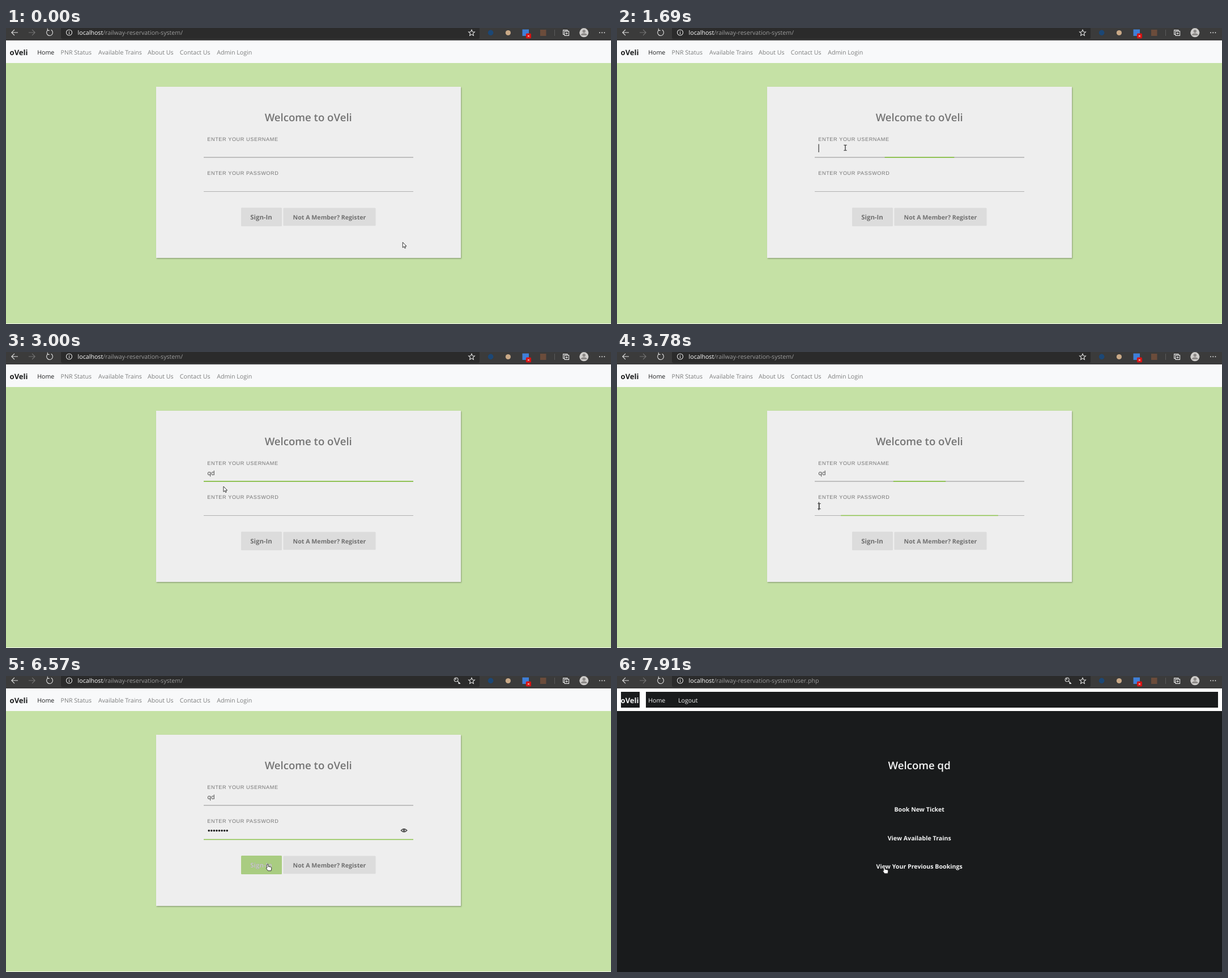
Animation of 1068x524 px, one loop 8 s. Source, as an HTML page:

```html
<!DOCTYPE html>
<html lang="en">
<head>
<meta charset="utf-8">
<title>Railway reservation sign-in</title>
<style>
  html, body { margin: 0; width: 100%; height: 100%; overflow: hidden; background: #c5e1a5; }
  svg { display: block; width: 1068px; height: 524px; }
  text { font: 10.65px "Open Sans", "Noto Sans", sans-serif; text-rendering: geometricPrecision; }
  .brand { font-size: 13px; font-weight: 700; }
  .title { font-size: 18.6px; font-weight: 600; text-anchor: middle; }
  .label { font: 9.1px "Liberation Sans", Arial, sans-serif; letter-spacing: .62px; fill: #757575; }
  .btn { font-weight: 700; text-anchor: middle; fill: #707070; }
  .big { font-size: 11.4px; }
  .small { font-size: 7.9px; }
  .light { fill: #f4f5f5; }
  .nav { fill: #7c7d7d; }
  .line { fill: none; stroke: #e4e4e4; stroke-width: 1.1; }
  .green { fill: #8bc34a; }
  .shape { fill: #fff; stroke: #222; stroke-width: .9; stroke-linejoin: round; }
</style>
</head>
<body>
<svg viewBox="0 0 1068 524">
  <defs>
    <filter id="cardShadow" x="-5%" y="-5%" width="110%" height="112%">
      <feDropShadow dx="1" dy="1.4" stdDeviation="1.3" flood-opacity=".3"/>
    </filter>
    <filter id="menuShadow" x="-5%" y="-40%" width="110%" height="200%">
      <feDropShadow dx="0" dy="2" stdDeviation="3" flood-opacity=".3"/>
    </filter>
  </defs>

  <g id="login">
    <rect width="1068" height="524" fill="#c5e1a5"/>
    <rect y="523" width="1068" height="1" fill="#f1f7ea"/>
    <rect y="22" width="1068" height="40" fill="#f8f9fa"/>
    <text class="brand" x="6.6" y="48" fill="#1b1c1d">oVeli</text>
    <text x="55.2" y="46.7" fill="#1d1e1f">Home</text>
    <g class="nav">
      <text x="96.5" y="46.7">PNR Status</text>
      <text x="163" y="46.7">Available Trains</text>
      <text x="250" y="46.7">About Us</text>
      <text x="306.8" y="46.7">Contact Us</text>
      <text x="372.2" y="46.7">Admin Login</text>
    </g>
    <rect x="265" y="104" width="538" height="303" fill="#eee" filter="url(#cardShadow)"/>
    <text class="title" x="533.7" y="165" fill="#757575">Welcome to oVeli</text>
    <text class="label" x="355.3" y="199.7">ENTER YOUR USERNAME</text>
    <text class="label" x="355.3" y="259.7">ENTER YOUR PASSWORD</text>
    <rect x="349" y="228.2" width="370" height="1.6" fill="#b4b4b4"/>
    <rect x="349" y="289" width="370" height="1" fill="#b0b0b0"/>
    <rect id="userLine" class="green" y="228.1" height="1.8"/>
    <rect id="passLine" class="green" y="288.7" height="1.5"/>
    <text id="user" x="355.6" y="217.5" fill="#333">qd</text>
    <g id="dots" fill="#151515"></g>
    <g id="eye" fill="none" stroke="#1a1a1a" stroke-width="1.1">
      <path d="M697.3 273.4Q702.6 267.6 707.9 273.4Q702.6 279.2 697.3 273.4Z"/>
      <circle cx="702.6" cy="273.4" r="1.5"/>
    </g>
    <rect id="caret" width="1" height="14.5" fill="#111"/>

    <rect x="415" y="318" width="72" height="33" rx="1.5" fill="#dcdcdc"/>
    <rect id="hover" class="green" x="415" y="318" width="72" height="33" rx="1.5"/>
    <rect id="ring" x="414.6" y="317.6" width="72.4" height="33.8" rx="2" fill="none" stroke="#111" stroke-width="1.3"/>
    <text class="btn big" x="450.5" y="339.2">Sign-In</text>
    <text id="hoverText" class="btn big" x="450.5" y="339.2" style="fill:#fff">Sign-In</text>
    <rect x="489.4" y="318.4" width="163.2" height="31.8" rx="1.5" fill="#dcdcdc"/>
    <text class="btn" x="571" y="338.9">Not A Member? Register</text>

    <g id="menu">
      <rect x="348" y="226.4" width="280.6" height="29.6" rx="2" fill="#4a4a4a" filter="url(#menuShadow)"/>
      <text class="small" x="357.2" y="244.6" fill="#fff">guard4</text>
    </g>
  </g>

  <g id="home">
    <rect width="1068" height="524" fill="#191b1c"/>
    <rect y="22" width="1068" height="40" fill="#fff"/>
    <rect x="7" y="28" width="33" height="28" fill="#191b1c"/>
    <rect x="51" y="28" width="1010" height="28" fill="#191b1c"/>
    <g class="light">
      <text class="brand" x="6.6" y="48">oVeli</text>
      <text x="55.2" y="46.7">Home</text>
      <text x="108" y="46.7">Logout</text>
      <text class="title" x="533.7" y="165">Welcome qd</text>
    </g>
    <text class="btn light" x="533.7" y="240.3" style="fill:#f4f5f5">Book New Ticket</text>
    <text class="btn light" x="533.7" y="290.5" style="fill:#f4f5f5">View Available Trains</text>
    <text class="btn light" x="533.7" y="341" style="fill:#f4f5f5">View Your Previous Bookings</text>
  </g>

  <g id="browser">
    <rect width="1068" height="22" fill="#3b3b3b"/>
    <path d="M97 0H836V16.5Q836 19.5 833 19.5H100Q97 19.5 97 16.5Z" fill="#2b2b2b"/>
    <path class="line" d="M21 8H9.8M15 2.8L9.8 8L15 13.2"/>
    <path class="line" d="M40 8H51.2M46 2.8L51.2 8L46 13.2" style="stroke:#757575"/>
    <g id="reload">
      <path class="line" d="M79.6 3.3A5.4 5.4 0 1 1 73.6 3.9M73.3 1V4.4H76.6"/>
    </g>
    <path id="stop" class="line" d="M72.6 3.6L81.4 12.4M81.4 3.6L72.6 12.4"/>
    <g class="line">
      <circle cx="111.5" cy="8" r="5"/>
      <path d="M111.5 7.3V11M111.5 5V6.2"/>
    </g>
    <text x="126.6" y="12.4" fill="#fff">localhost<tspan fill="#9c9c9c">/railway-reservation-system/<tspan id="page">user.php</tspan></tspan></text>
    <g id="key" class="line">
      <circle cx="794.6" cy="6.4" r="3.4"/>
      <path d="M797 8.8L802 13.6M799 11V13.4H801.6"/>
      <circle cx="793.8" cy="5.5" r=".6"/>
    </g>
    <path id="star" class="line"/>
    <circle cx="855.6" cy="8.4" r="4.8" fill="#1c4775"/>
    <circle cx="886.4" cy="8.5" r="4.6" fill="#c9a987"/>
    <rect x="911.5" y="2.5" width="11.5" height="11.5" fill="#3f7fd8"/>
    <rect x="917.8" y="9.6" width="9.2" height="9" rx="1.8" fill="#d81313"/>
    <path d="M921 12.9L923.8 15.7M923.8 12.9L921 15.7" stroke="#fff"/>
    <rect x="943" y="3" width="10.5" height="11" fill="#6b4c3b"/>
    <path d="M968.5 3V14" stroke="#5a5a5a"/>
    <path class="line" d="M986 11.4H983.6V3.6H991V5.6M986 5.6H993.6V13.4H986ZM989.8 7.4V11.6M987.7 9.5H991.9"/>
    <circle cx="1020.3" cy="8.3" r="8" fill="#d0cecc"/>
    <g fill="#8d8a88">
      <circle cx="1020.3" cy="5.8" r="2.7"/>
      <path d="M1015 13Q1015 9.3 1020.3 9.3T1025.6 13Z"/>
    </g>
    <g fill="#e4e4e4">
      <circle cx="1048" cy="8.2" r=".95"/><circle cx="1052.2" cy="8.2" r=".95"/><circle cx="1056.4" cy="8.2" r=".95"/>
    </g>
  </g>

  <g id="cursor">
    <path id="arrow" class="shape" d="M.3 .3V9.8L2.5 7.8L4 11L5.5 10.3L4.1 7.2H7Z"/>
    <path id="ibeam" d="M-2.6 -4.6H2.6M0 -4.6V4.6M-2.6 4.6H2.6" fill="none" stroke="#444" stroke-width="1.4"/>
    <path id="hand" class="shape" d="M-1.2 .8Q0 -.9 1.1 .8V4.2L5.6 5.2Q7 5.6 6.8 7.2L6 11.8H.4L-2.7 7.6Q-2.7 6 -1.2 6.9Z"/>
  </g>
</svg>

<script>
const LOOP = 8000;
const NS = "http://www.w3.org/2000/svg";
const $ = id => document.getElementById(id);
const show = (id, on) => { $(id).style.display = on ? "" : "none"; };
const setAttrs = (el, attrs) => { for (const k in attrs) el.setAttribute(k, attrs[k]); };

// Bursts of screen updates: first time, last time, count.
const bursts = [
  [0, 0, 1], [430, 580, 3], [830, 1290, 7], [1590, 2220, 9], [2300, 2300, 1],
  [2830, 3290, 7], [3550, 3550, 1], [3690, 3780, 2], [3860, 4240, 7],
  [6270, 6570, 5], [6670, 6820, 3], [6970, 7590, 9], [7760, 7760, 1], [7910, 7910, 1]
];
const keyTimes = [4080, 4240, 4620, 4790, 5030, 5180, 5490, 5720];
const ticks = bursts.flatMap(([a, b, n]) =>
  Array.from({ length: n }, (_, i) => n > 1 ? Math.floor(a + (b - a) * i / (n - 1)) : a))
  .concat(keyTimes).sort((a, b) => a - b);

// Pointer hotspot: time, x, y.
const path = [
  [0, 700, 379], [360, 700, 379], [430, 640, 340], [500, 540, 272], [580, 489, 241],
  [760, 489, 241], [830, 485, 239], [1290, 403, 212], [2760, 403, 212],
  [3290, 357, 273], [6200, 357, 273], [6420, 430, 322], [6570, 462, 333],
  [6820, 466, 335], [7590, 470, 337], [7760, 472, 338], [LOOP, 472, 338]
];

function pointer(t) {
  const i = path.findIndex(p => p[0] > t);
  const [t0, x0, y0] = path[i - 1], [t1, x1, y1] = path[i];
  const f = (t - t0) / (t1 - t0);
  return [x0 + (x1 - x0) * f, y0 + (y1 - y0) * f];
}

// The CSS "ease" curve.
function ease(x) {
  if (x <= 0) return 0;
  if (x >= 1) return 1;
  let lo = 0, hi = 1, s;
  for (let i = 0; i < 20; i++) {
    s = (lo + hi) / 2;
    const at = .75 * s * (1 - s) + s ** 3;
    if (at < x) lo = s; else hi = s;
  }
  return .3 * s * (1 - s) ** 2 + 3 * s * s * (1 - s) + s ** 3;
}
const fade = (t, start, span) => ease((t - start) / span);

function setLine(id, f) {
  setAttrs($(id), { x: 534 - 185 * f, width: 370 * f });
}

function cursorKind(x, y, t) {
  if (t >= 7910) return "hand";
  if (x > 415 && x < 487 && y > 318 && y < 351) return "hand";
  const inField = x > 348 && x < 719 && (y > 204 && y < 229 || y > 263 && y < 290);
  return inField ? "ibeam" : "arrow";
}

function render(now) {
  const t = ticks.filter(k => k <= now).pop();
  const typed = keyTimes.filter(k => k <= t).length;

  show("login", t < 7910);
  show("home", t >= 7910);
  show("page", t >= 7760);
  show("key", t >= keyTimes[0]);
  const loading = t >= 7120 && t < 7910;
  show("stop", loading);
  show("reload", !loading);

  show("menu", t >= 1740 && t < 2300);
  show("user", t >= 2300);
  show("eye", typed > 0 && t < 6970);
  [...$("dots").children].forEach((d, i) => { d.style.display = i < typed ? "" : "none"; });
  setLine("userLine", fade(t, 1560, 500) - fade(t, 3545, 520));
  setLine("passLine", fade(t, 3545, 520) - fade(t, 6960, 520));

  const inPass = t >= 3550;
  show("caret", t >= 1590 && t < 2830 || inPass && t < 6270 || t >= 6820 && t < 6970);
  setAttrs($("caret"), {
    x: inPass ? 355.8 + 4.57 * typed : t >= 2300 ? 369 : 355.6,
    y: inPass ? 265.5 : 205.5
  });

  const hover = fade(t, 6425, 400);
  $("hover").style.opacity = hover;
  $("hoverText").style.opacity = hover;
  show("ring", t >= 6970);

  const [x, y] = pointer(t);
  const kind = cursorKind(x, y, t);
  for (const k of ["arrow", "ibeam", "hand"]) show(k, k === kind);
  $("cursor").setAttribute("transform", `translate(${x} ${y})`);
}

for (let i = 0; i < 8; i++) {
  const dot = document.createElementNS(NS, "circle");
  setAttrs(dot, { cx: 358.2 + 4.57 * i, cy: 273.8, r: 1.75 });
  $("dots").append(dot);
}
const starPoints = Array.from({ length: 10 }, (_, i) => {
  const a = Math.PI * (i / 5 - .5), r = i % 2 ? 2.6 : 5.7;
  return `${822 + r * Math.cos(a)} ${8.8 + r * Math.sin(a)}`;
});
$("star").setAttribute("d", `M${starPoints.join("L")}Z`);

const start = performance.now();
function loop() {
  render((performance.now() - start) % LOOP);
  requestAnimationFrame(loop);
}
loop();
</script>
</body>
</html>
```
